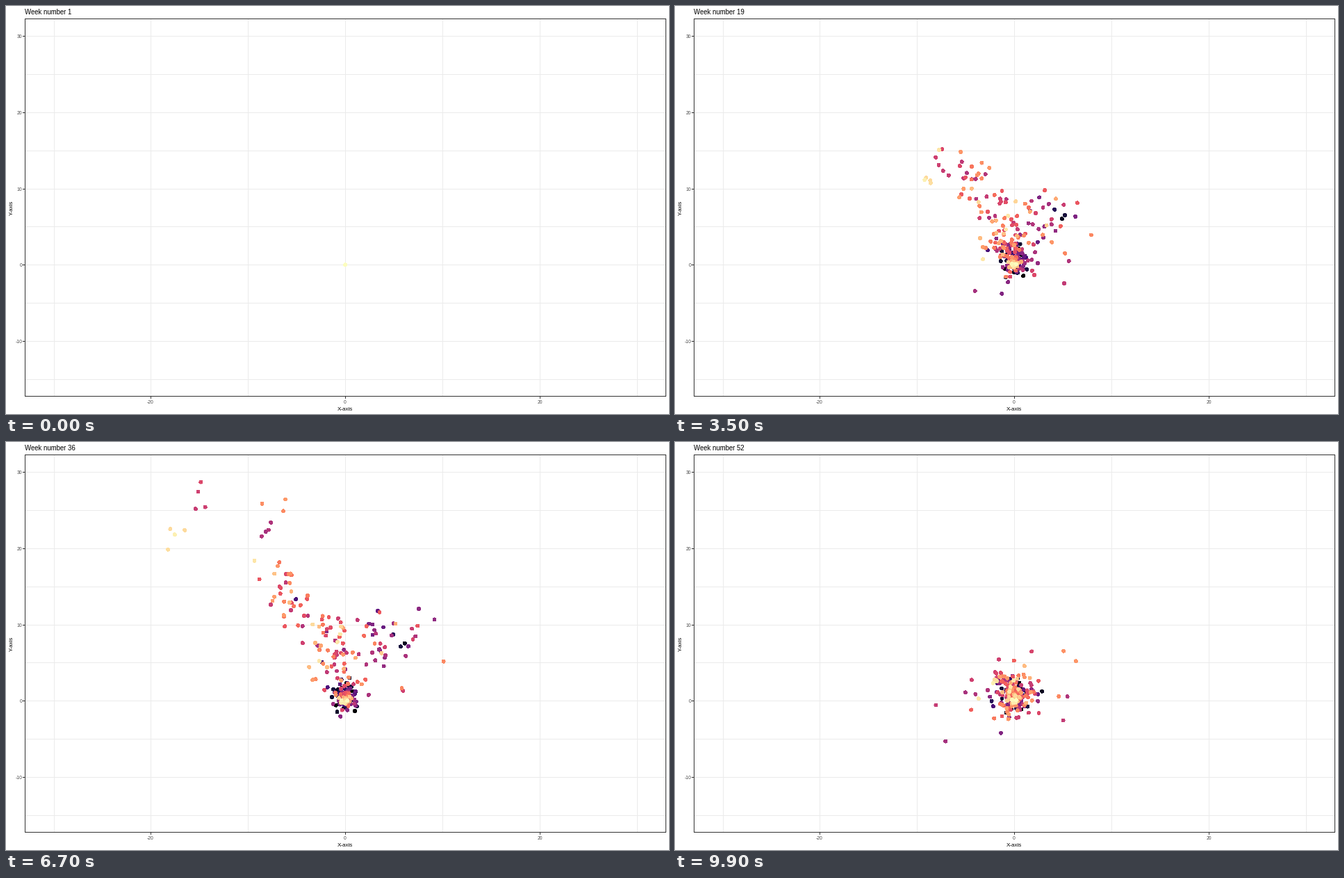
Animation, 954 px wide and 587 px high, one loop 10 s. Source, as a matplotlib script:

```python
import numpy as np
import matplotlib.pyplot as plt
from matplotlib.animation import FuncAnimation

W, H = 954, 587
FRAMES, WEEKS = 100, 52
LEFT, RIGHT, TOP, BOTTOM = 27, 949, 18, 561
GRID, BORDER, TICK_TEXT = "#EBEBEB", "#333333", "#4D4D4D"
N_CORE, N_LEFT, N_RIGHT = 130, 90, 52

plt.rcParams["font.family"] = "Liberation Sans"
rng = np.random.default_rng(52)
week = np.arange(1, WEEKS + 1)[:, None]


def px(x):
    return 488.1 + 13.985 * x


def py(y):
    return 372.4 - 10.985 * y


def cloud(n, x, y, sx, sy):
    return np.column_stack([rng.normal(x, sx, n), rng.normal(y, sy, n)])


def core():
    """Points that stay around the origin, the palest ones closest."""
    hue = rng.beta(1, 1.3, N_CORE)
    hue[0] = 1
    home = cloud(N_CORE, 0, .6, .75, 1) * (1.2 - hue)[:, None]
    return np.tile(home, (WEEKS, 1, 1)), hue


def arms():
    """Points that leave for a V shape in the middle of the year."""
    n = N_LEFT + N_RIGHT
    home = np.column_stack([rng.laplace(0, 1.1, n), rng.laplace(1, 1.2, n)])
    t = rng.uniform(0, 1, N_LEFT) ** 1.2
    left = np.column_stack([-7.5 * t ** 1.2 - .4, 4 + 13 * t])
    left += cloud(N_LEFT, 0, 0, 1.3, 1.7)
    right = cloud(N_RIGHT, 4, 7.4, 2.6, 2.7)
    goal = np.vstack([left, right])

    start, end = rng.uniform(9, 20, n), rng.uniform(38, 50, n)
    out = np.clip((week - start) / 5, 0, 1) * np.clip((end - week) / 5, 0, 1)
    size = np.interp(week, [10, 19, 29, 36, 46], [.6, .85, 1, 1, .6])
    path = home + (goal * size[..., None] - home) * out[..., None]
    hue = np.concatenate([rng.normal(.68, .15, N_LEFT),
                          rng.normal(.55, .2, N_RIGHT)])
    return path, np.clip(hue, 0, .95)


def flock(hue, n, x, y, reach):
    """Points sharing one hue and one far turning point."""
    peak = cloud(n, x, y, .9, .9)
    return peak * reach[..., None], np.clip(rng.normal(hue, .015, n), 0, 1)


def swarm():
    far = np.interp(week, [1, 10, 19, 29, 36, 46, 52],
                    [0, .1, .5, 1, .98, .3, .12])
    near = np.clip(1.15 * (1 - far), 0, 1)
    parts = [
        core(), arms(),
        flock(.57, 4, -14.8, 27.3, far),
        flock(.94, 4, -18.3, 21.7, far),
        flock(.76, 3, -7.8, 25.5, far),
        flock(.48, 4, -7.8, 22, far),
        flock(.48, 1, -7.6, -6.5, near),
        flock(.76, 2, 6, 5.6, near),
    ]
    path = np.concatenate([p for p, _ in parts], axis=1)
    hue = np.concatenate([h for _, h in parts])
    drift = rng.laplace(0, .15, path.shape)
    path += drift * (.5 + np.hypot(path[..., :1], path[..., 1:]) / 8)
    path[..., 0] = np.minimum(path[..., 0], 12)
    path[..., 1] = np.maximum(path[..., 1], -7)
    path[0] = 0
    order = np.argsort(hue)
    return path[:, order], hue[order]


path, hue = swarm()

fig = plt.figure(figsize=(W / 72, H / 72), dpi=72, facecolor="white")
ax = fig.add_axes([0, 0, 1, 1])
ax.set(xlim=(0, W), ylim=(H, 0))
ax.axis("off")


def line(xs, ys, color):
    ax.plot(xs, ys, color=color, lw=1, antialiased=False,
            solid_capstyle="butt", zorder=1)


def label(x, y, s, size, color="black", **kw):
    return ax.text(x, y, s, fontsize=size, color=color, **kw)


for v in range(-30, 31, 10):
    x = round(px(v))
    line([x, x], [TOP, BOTTOM], GRID)
for v in range(-15, 31, 5):
    y = round(py(v))
    line([LEFT, RIGHT], [y, y], GRID)

for v in (-20, 0, 20):
    x = round(px(v))
    line([x, x], [BOTTOM, BOTTOM + 3], BORDER)
    label(x, 571.7, str(v), 6.8, TICK_TEXT, ha="center")
for v in range(-10, 31, 10):
    y = round(py(v))
    line([LEFT - 3, LEFT], [y, y], BORDER)
    label(23.5, y + 3, str(v), 6.8, TICK_TEXT, ha="right")

line([LEFT, RIGHT, RIGHT, LEFT, LEFT], [TOP, TOP, BOTTOM, BOTTOM, TOP], BORDER)
label(488, 581.7, "X-axis", 8, ha="center")
label(8.5, 290, "Y-axis", 8, ha="center", va="center", rotation=90)
title = label(27, 12.4, "", 9.6)

dots = ax.scatter(0 * hue, 0 * hue, s=4.9 ** 2, c=plt.get_cmap("magma")(hue),
                  linewidths=0, antialiased=False, zorder=3)


def update(i):
    t = (WEEKS - 1) * i / (FRAMES - 1)
    a = min(int(t), WEEKS - 2)
    pts = path[a] + (path[a + 1] - path[a]) * (t - a)
    dots.set_offsets(np.column_stack([px(pts[:, 0]), py(pts[:, 1])]))
    title.set_text(f"Week number {round(1 + t)}")
    return dots, title


anim = FuncAnimation(fig, update, frames=FRAMES, interval=100,
                     repeat=True, repeat_delay=0, blit=False)
plt.show()
```
